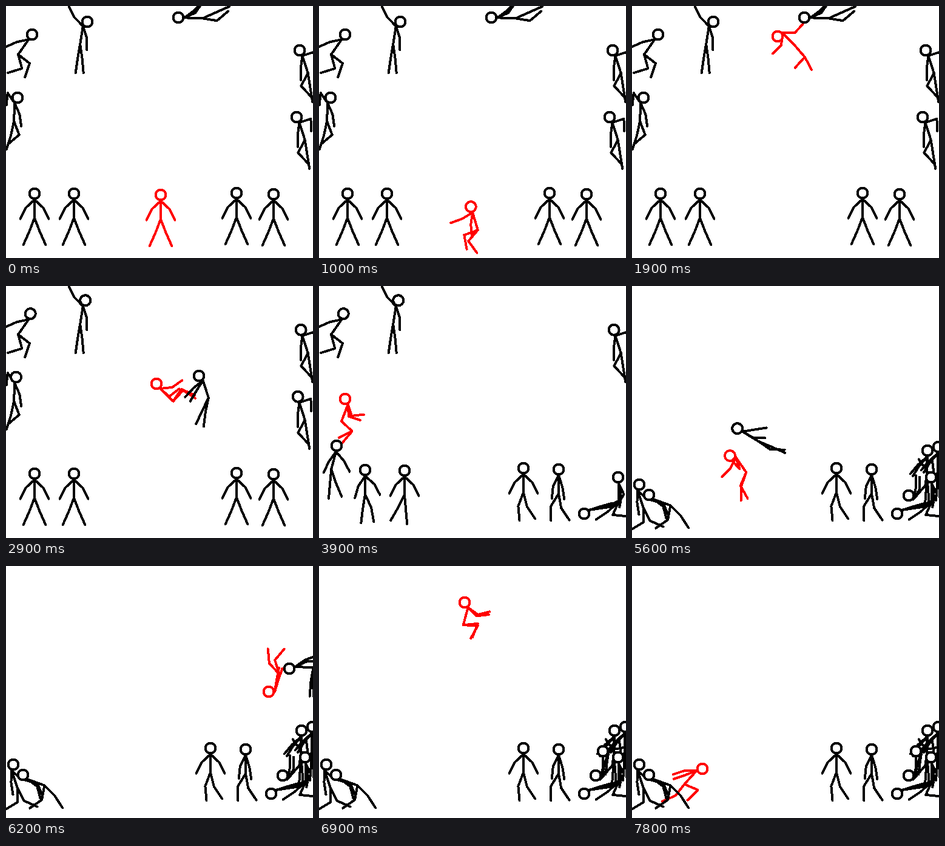
An HTML page for the animation above (8 s loop, 506 px wide and 415 px high).

```html
<!DOCTYPE html>
<html lang="en">
<head>
<meta charset="utf-8">
<title>Stick fight</title>
<style>
  html, body { margin: 0; width: 100%; height: 100%; overflow: hidden; background: #fff; }
  svg { display: block; width: 100vw; height: 100vh; }
  path, circle { stroke-width: 4; stroke-linecap: round; stroke-linejoin: round; shape-rendering: crispEdges; }
  path { fill: none; }
  circle { fill: #fff; }
</style>
</head>
<body>
<svg id="stage" viewBox="0 0 506 415"></svg>
<script>
const LOOP = 8000, STEP = 100;
const NECK = 10, SPINE = 30, ARM = 20, LEG = 24, SPLAY = 4;

const rad = deg => deg * Math.PI / 180;

// Two angles describe a matching pair of limbs, held slightly apart
const pair = l => l.length > 2 ? l : [l[0] - SPLAY, l[1] - SPLAY, l[0] + SPLAY, l[1] + SPLAY];

// Bone directions in degrees: 0 points down, 90 to the right
const rig = (spine, { neck = spine, arms = [-47, -26, 47, 26], legs = [-21, -24, 21, 24] } = {}) =>
  [neck, spine, ...pair(arms), ...pair(legs)];

const flip = p => p.map(a => -a);
const relax = ([neck, ...rest]) => [neck / 2, ...rest];

const stand = rig(0);
const pass = rig(0, { arms: [-29, -18, 29, 16], legs: [7, -14, 14, -5] });
const stepLeft = rig(0, { arms: [-34, -16, 49, 28], legs: [-9, -7, 25, 10] });
const stepBack = rig(0, { legs: [-27, -30, 5, 5] });
const stepRight = rig(0, { legs: [-21, 5, 14, 34] });
const stepLong = rig(0, { arms: [-27, -6, 18, 9], legs: [-32, 0, 10, 34] });
const walk = rig(-15, { neck: -6, arms: [-36, -25, 41, 28], legs: [-5, -5, 19, 23] });

const guard = rig(0, { arms: [-70, -106, 66, 108], legs: [-36, -31, 36, 31] });
const crouch = rig(25, { arms: [-50, -48], legs: [-83, 35] });
const spring = rig(2, { arms: [-37, -30, 33, 30], legs: [-42, 32] });
const grab = rig(44, { neck: 125, arms: [90, 137, -6, -45], legs: [41, 28, 41, -42] });
const fall = rig(46, { neck: 37, arms: [96, 125, 50, 128], legs: [142, 62] });
const stomp = rig(-21, { neck: 29, arms: [18, 96, 3, 72], legs: [47, -64, 47, -40] });
const kick = rig(52, { neck: 6, arms: [-3, 45, -3, 45], legs: [48, 40, 48, 40] });
const dive = rig(166, { neck: 90, arms: [167, 165], legs: [-137, -175, -163, 140] });
const land = rig(-42, { neck: -72, arms: [-90, -72, -69, -71], legs: [67, -45, -38, -67] });
const tuck = rig(-15, { neck: 34, arms: [50, 100], legs: [92, -25] });

const cling = rig(-18, { neck: -26, arms: [-108, -2, 7, 0], legs: [-9, -9, 28, -43] });
const hook = rig(-2, { neck: -29, arms: [-145, -6, 24, 8], legs: [-12, -18, 21, -50] });
const lunge = rig(-35, { arms: [-78, -66, -78, -66], legs: [15, -73, 52, -19] });
const hang = rig(-9, { neck: -45, arms: [-135, -153, 18, 0], legs: [-10, -8, 8, 5] });
const perch = rig(88, { arms: [114, 146, 126, 135], legs: [114, 114, 81, 130] });
const hover = rig(88, { neck: 107, arms: [125, 110, 115, 95], legs: [-6, 0] });
const stoop = rig(18, { neck: 41, arms: [-51, -43, -32, -31], legs: [-26, -25, -12, -7] });
const upside = rig(139, { neck: 49, arms: [167, 180, 148, 180], legs: [172, 215, 143, 187] });
const flung = rig(-37, { neck: -27, arms: [-71, -50, -27, -12], legs: [-43, -90, -34, -62] });
const brace = rig(2, { neck: 41, arms: [-74, -100], legs: [-7, -7, -7, 18] });
const kneel = rig(18, { neck: -15, arms: [-3, 9, 47, 74], legs: [0, -59, 27, 66] });
const crawl = rig(70, { neck: 45, arms: [58, 19], legs: [45, 33, -10, -55] });
const sit = rig(0, { neck: 6, arms: [25, -31, 10, -6], legs: [-47, -56, -24, 84] });
const lie = rig(102, { neck: 127, arms: [103, 102], legs: [110, -68] });
const slump = rig(-2, { arms: [-45, -36], legs: [2, 0] });
const drop = rig(100, { arms: [-13, -11], legs: [10, 0] });

// Tracks are keys of time, head x, head y, pose
const red = [
  [0, 255, 311, stand], [400, 255, 316, guard], [600, 255, 316, guard],
  [1200, 248, 338, crouch], [1500, 255, 316, spring],
  [1900, 240, 50, grab], [2000, 243, 46, grab], [2100, 243, 46, grab],
  [2900, 248, 161, fall], [3200, 262, 150, kick], [3500, 170, 140, tuck],
  [3900, 43, 186, stomp], [4200, 45, 110, tuck], [4400, 75, 40, kick],
  [4800, 190, 92, tuck], [5000, 219, 115, kick], [5300, 140, 240, flip(kick)],
  [5500, 158, 294, crouch], [5700, 165, 265, grab], [6200, 433, 207, dive],
  [6600, 300, 112, tuck], [6900, 240, 60, tuck], [7200, 175, 170, crouch],
  [7500, 119, 334, land], [7800, 116, 334, land]
];

// Hold on, ease the neck while the body stays put, then leave
function wait(x, y, p, leave) {
  const n = rad(p[0]);
  const settled = [x + NECK * (Math.sin(n) - Math.sin(n / 2)),
                   y + NECK * (Math.cos(n) - Math.cos(n / 2)), relax(p)];
  return [[2100, x, y, p], [2900, ...settled], [leave, ...settled]];
}

const stroll = (x, y, toX, toY, end) => [
  [3000, x, y, stand],
  [3450, (x + toX) / 2, (y + toY) / 2, pass],
  [3900, toX, toY, end]
];

const black = [
  [[1900, 284, 19, perch], [2000, 286, 22, perch], [2100, 286, 22, perch],
   [2900, 318, 148, stoop], [3100, 318, 148, stoop], [3600, 437, 375, lie]],
  [...wait(19, 151, hook, 3100), [3800, 29, 263, walk], [3900, 29, 263, walk], [4400, 12, 327, kneel]],
  [...wait(43, 47, lunge, 4200), [5000, 367, 240, upside], [5500, 456, 345, upside]],
  [...wait(134, 26, hang, 4300), [5000, 490, 133, flung], [5500, 487, 271, slump]],
  [...wait(484, 73, flip(cling), 4200), [4900, 493, 150, brace], [5000, 493, 150, brace], [5500, 505, 265, slump]],
  [...stroll(112, 309, 141, 304, stepBack), [5400, 141, 304, stepBack],
   [5700, 190, 200, perch], [6200, 467, 169, hover], [6600, 468, 305, drop]],
  [...wait(479, 183, flip(cling), 3100), [3700, 493, 315, sit]],
  [...stroll(47, 309, 76, 303, stepLeft), [5200, 76, 303, stepLeft], [5600, 28, 344, crawl]],
  stroll(380, 308, 337, 300, stepRight),
  stroll(441, 310, 395, 302, stepLong)
];

const mix = (a, b, k) => a + (b - a) * k;
const turn = (a, b, k) => a + ((b - a + 540) % 360 - 180) * k;

function sample(keys, t) {
  const next = keys.findIndex(key => key[0] > t);
  if (next <= 0) return keys[next < 0 ? keys.length - 1 : 0].slice(1);
  const [t0, x0, y0, p0] = keys[next - 1], [t1, x1, y1, p1] = keys[next];
  const k = (t - t0) / (t1 - t0);
  return [mix(x0, x1, k), mix(y0, y1, k), p0.map((a, i) => turn(a, p1[i], k))];
}

const bone = ([x, y], deg, len) => [x + len * Math.sin(rad(deg)), y + len * Math.cos(rad(deg))];

function limb(root, upper, lower, len) {
  const mid = bone(root, upper, len);
  return [root, mid, bone(mid, lower, len)];
}

function skeleton(x, y, [n, s, a1, a2, a3, a4, l1, l2, l3, l4]) {
  const neck = bone([x, y], n, NECK);
  const hip = bone(neck, s, SPINE);
  return [
    [neck, hip],
    limb(neck, a1, a2, ARM), limb(neck, a3, a4, ARM),
    limb(hip, l1, l2, LEG), limb(hip, l3, l4, LEG)
  ];
}

const stage = document.getElementById('stage');
function add(tag, attrs) {
  const el = document.createElementNS(stage.namespaceURI, tag);
  for (const name in attrs) el.setAttribute(name, attrs[name]);
  return stage.appendChild(el);
}

const figures = [red, ...black].map((keys, i) => {
  const stroke = i ? '#000' : '#f00';
  return { keys, body: add('path', { stroke }), head: add('circle', { r: 8.5, stroke }) };
});

function draw(t) {
  for (const { keys, body, head } of figures) {
    const [x, y, p] = sample(keys, t);
    const lines = skeleton(x, y, p).map(line => 'M' + line.map(pt => pt.map(v => v.toFixed(1))).join('L'));
    body.setAttribute('d', lines.join(''));
    head.setAttribute('cx', x);
    head.setAttribute('cy', y);
  }
}

const start = performance.now();
function tick() {
  const t = (performance.now() - start) % LOOP;
  draw(Math.floor(t / STEP) * STEP);
  requestAnimationFrame(tick);
}
draw(0);
requestAnimationFrame(tick);
</script>
</body>
</html>
```
